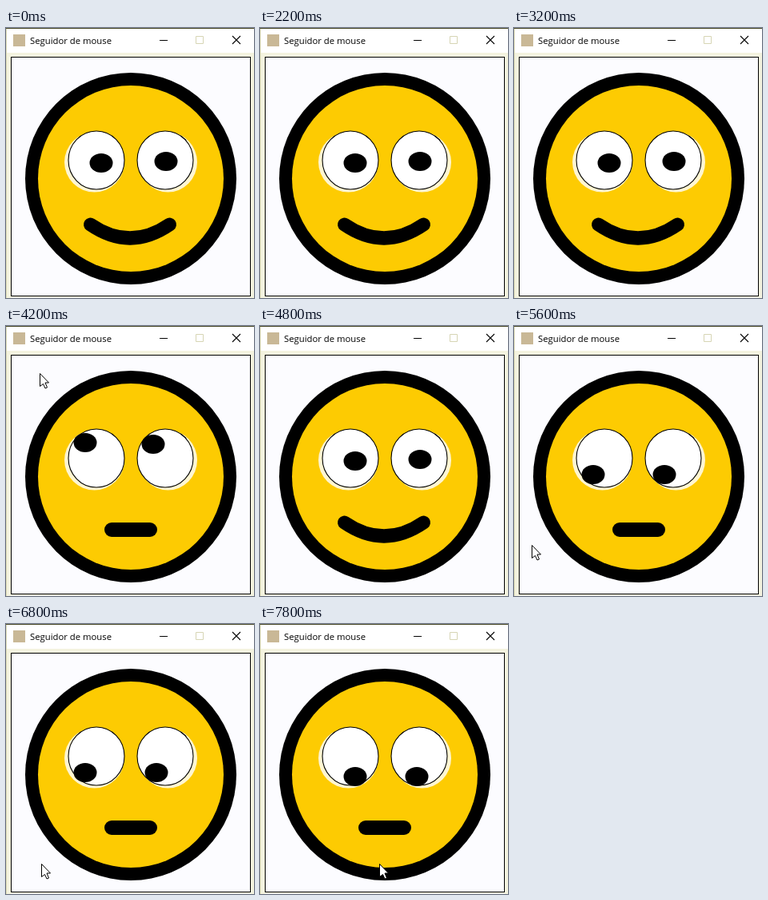
Animation, 310 px wide and 338 px high, one loop 8000 ms. Source, as an HTML page with a canvas:

```html
<!DOCTYPE html>
<html lang="pt">
<head>
<meta charset="utf-8">
<title>Seguidor de mouse</title>
<style>
  html, body { margin: 0; width: 100%; height: 100%; overflow: hidden; background: #fff; }
  canvas { display: block; }
</style>
</head>
<body>
<canvas id="stage" width="310" height="338"></canvas>
<script>
const ctx = document.getElementById('stage').getContext('2d');
const LOOP = 8000;
const INK = '#000';
const TAU = Math.PI * 2;

// Pupil centres: [left x, left y, right x, right y]
const REST = [119, 169, 200, 167];
const UP_IN = [127, 147, 185, 148];
const UP_RIGHT = [128, 147, 187, 147];
const UP_LEFT = [99, 146, 184, 148];
const LEFT = [98, 147, 184, 148];
const DOWN_LEFT = [99, 186, 188, 186];
const DOWN = [119, 191, 196, 191];

// The face smiles while the pointer is outside the panel.
const steps = [
  { at: 0, look: REST },
  { at: 2600, look: UP_IN, pointer: [150, 90] },
  { at: 2800, look: UP_RIGHT, pointer: [165, 79] },
  { at: 3000, look: REST, pointer: [170, 25] },
  { at: 3200, look: REST },
  { at: 4200, look: UP_LEFT, pointer: [42, 59] },
  { at: 4400, look: LEFT, pointer: [55, 78] },
  { at: 4600, look: LEFT, pointer: [48, 76] },
  { at: 4800, look: REST },
  { at: 5600, look: DOWN_LEFT, pointer: [22, 274] },
  { at: 5800, look: DOWN_LEFT, pointer: [28, 272] },
  { at: 6000, look: DOWN_LEFT, pointer: [30, 273] },
  { at: 6200, look: REST },
  { at: 6600, look: REST, pointer: [17, 336] },
  { at: 6800, look: DOWN_LEFT, pointer: [44, 300] },
  { at: 7000, look: DOWN_LEFT, pointer: [49, 297] },
  { at: 7200, look: DOWN_LEFT },
  { at: 7400, look: REST },
  { at: 7800, look: DOWN, pointer: [149, 300] }
];

function rect(x, y, w, h, color) {
  ctx.fillStyle = color;
  ctx.fillRect(x, y, w, h);
}

function oval(x, y, rx, ry, fill, outline) {
  ctx.beginPath();
  ctx.ellipse(x, y, rx, ry, 0, 0, TAU);
  ctx.fillStyle = fill;
  ctx.fill();
  if (outline) stroke(outline, 1.1);
}

function stroke(color, width) {
  ctx.strokeStyle = color;
  ctx.lineWidth = width;
  ctx.stroke();
}

function line(x1, y1, x2, y2, color, width) {
  ctx.beginPath();
  ctx.moveTo(x1, y1);
  ctx.lineTo(x2, y2);
  stroke(color, width);
}

function drawWindow() {
  rect(0, 0, 310, 338, '#f4f3df');
  rect(0, 0, 310, 31, '#fff');
  rect(0, 0, 310, 1, '#4a4a28');
  rect(0, 1, 1, 337, '#d9d8b4');
  rect(6, 36, 300, 300, INK);
  rect(7, 37, 298, 298, '#fcfcff');

  rect(9, 8, 15, 15, '#c9b896');
  ctx.fillStyle = INK;
  ctx.font = '11.3px "Open Sans", "Noto Sans", sans-serif';
  ctx.fillText('Seguidor de mouse', 30, 20);

  line(192, 15.5, 202, 15.5, INK, 1);
  ctx.beginPath();
  ctx.rect(237.5, 10.5, 9, 9);
  stroke('#d6d5b4', 1);
  line(283, 10, 293, 20, INK, 1.1);
  line(293, 10, 283, 20, INK, 1.1);
}

function drawMouth(smiling) {
  ctx.lineCap = 'round';
  if (smiling) {
    ctx.beginPath();
    ctx.moveTo(105.5, 246);
    ctx.quadraticCurveTo(155, 280, 204.5, 246);
    stroke(INK, 17);
  } else {
    line(132, 255, 180, 255, INK, 18);
  }
  ctx.lineCap = 'butt';
}

function drawFace(look) {
  oval(156, 188.5, 132, 132.5, INK);
  oval(156, 188.5, 116, 116.5, '#fdcb02');

  oval(110.5, 168, 37.5, 37.5, '#fff6d2');
  oval(202.5, 168, 36.5, 37.5, '#fff6d2');
  line(219, 136, 225, 141, INK, 2);
  oval(113, 165.5, 35, 36.5, '#fff', INK);
  oval(199, 165.5, 35, 36.5, '#fff', INK);

  const [lx, ly, rx, ry] = look;
  oval(lx, ly, 14.5, 12, INK);
  oval(rx, ry, 14.5, 12, INK);
  drawMouth(look === REST);
}

function drawPointer([x, y]) {
  const outline = [[0, 0], [0, 16], [4, 13], [6.5, 18.5], [9, 17.5], [6.5, 11.5], [11, 11.5]];
  ctx.beginPath();
  for (const [dx, dy] of outline) ctx.lineTo(x + dx + 0.5, y + dy + 0.5);
  ctx.closePath();
  ctx.fillStyle = '#fff';
  ctx.fill();
  stroke(INK, 1);
}

function draw(now) {
  const time = now % LOOP;
  const step = steps.filter(s => s.at <= time).pop();
  drawWindow();
  drawFace(step.look);
  if (step.pointer) drawPointer(step.pointer);
}

function tick() {
  draw(performance.now());
  requestAnimationFrame(tick);
}

tick();
</script>
</body>
</html>
```
